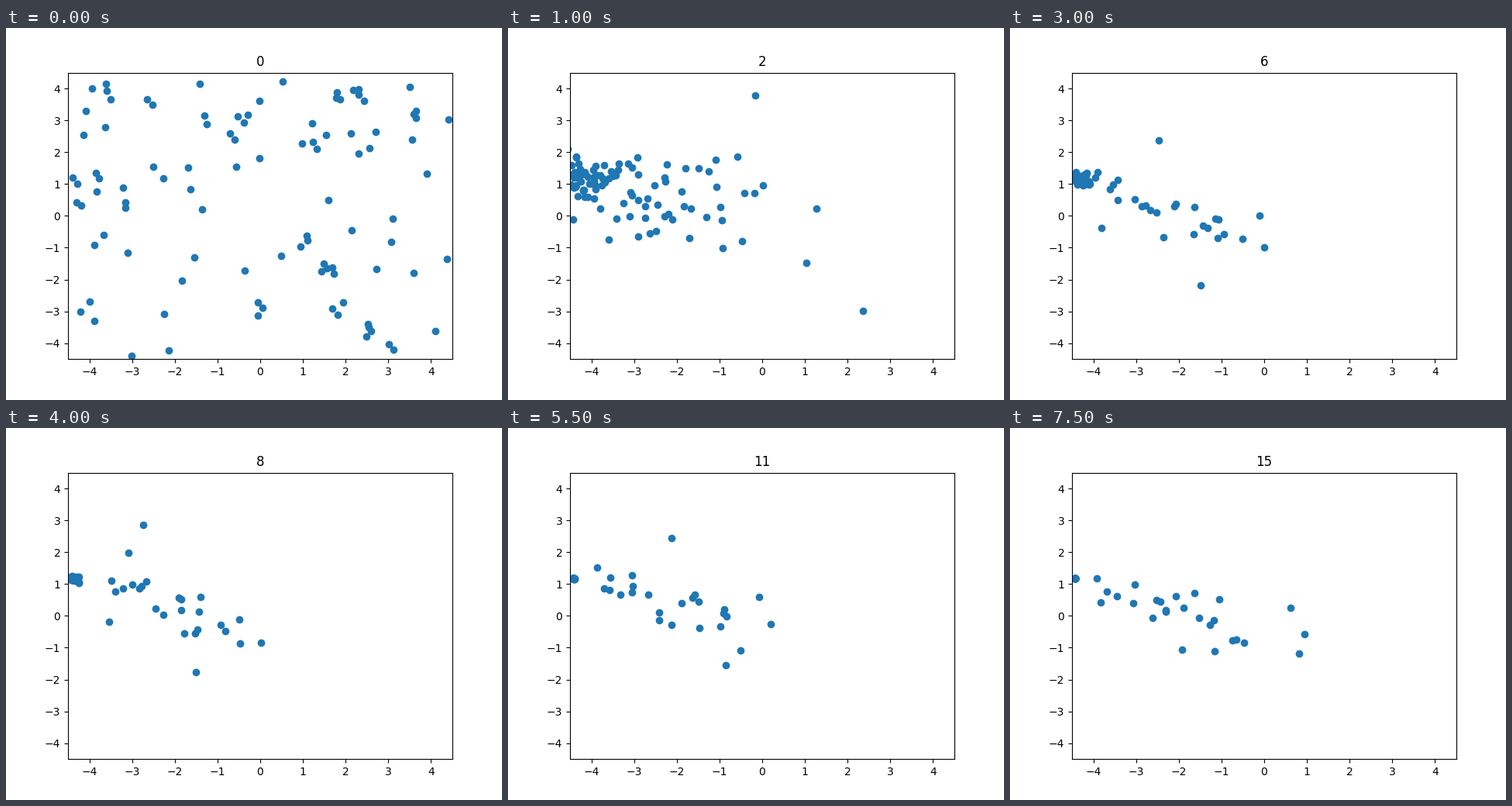
Write a matplotlib script that moves like this. It is 640x480 px and loops after 8 s.

```python
import matplotlib.pyplot as plt
import numpy as np
from matplotlib.animation import FuncAnimation

STEPS = 16
INTERVAL = 500
GOAL = np.array([84, 194])
SCATTERED, DRIFTERS = 60, 22

# Starting places, in stage pixels, of the dots that begin in pairs.
PAIRED = np.array([
    [130, 81], [182, 92], [116, 187], [86, 193], [91, 225], [299, 114],
    [289, 136], [427, 83], [455, 86], [396, 147], [526, 111], [325, 354],
    [388, 268], [410, 304], [421, 309], [421, 362], [467, 382], [494, 408],
])

# Waypoints of the dots that roam furthest, one row each.
KEY_STEPS = [0, 2, 4, 6, 10, 13, 15]
ROAM = np.array([
    [357, 69, 319, 87, 210, 137, 192, 145, 188, 146, 263, 112, 238, 213],
    [569, 298, 458, 365, 294, 304, 246, 332, 247, 298, 310, 276, 373, 291],
    [499, 246, 385, 303, 346, 257, 328, 283, 316, 250, 347, 263, 380, 266],
    [416, 222, 398, 233, 324, 214, 322, 242, 293, 211, 334, 225, 362, 232],
])

rng = np.random.default_rng(11)


def to_data(px):
    return (px - [328, 242.4]) / [496 / 9, -369.6 / 9]


def swarm_path(start):
    """Dots that collapse geometrically onto the goal."""
    path = [start]
    for k in range(1, STEPS):
        size = 0.3 * 0.6 ** (k - 1)
        pull = size * np.minimum(rng.exponential(size=(len(start), 1)), 2.8)
        noise = rng.normal(size=start.shape) * size * [40, 80]
        path.append(GOAL + (start - GOAL) * pull + noise)
    return np.array(path)


def drift_path(start):
    """Dots that settle into a loose band sloping away from the goal."""
    n = len(start)
    base = (np.arange(n) + 0.5) / n
    path = []
    for k in range(STEPS):
        x = 112 + 190 * np.clip(base + rng.normal(0, 0.07, n), 0, 1)
        y = GOAL[1] + 0.3 * (x - GOAL[0]) + rng.normal(0, 20, n)
        band = np.column_stack([x, y])
        path.append(band + (start - band) * 0.5 ** k)
    return np.array(path)


def roam_path():
    """Dots that visit their waypoints, shaken on the way between them."""
    k = np.arange(STEPS)
    path = np.array([[np.interp(k, KEY_STEPS, row[axis::2]) for axis in (0, 1)]
                     for row in ROAM]).transpose(2, 0, 1)
    between = ~np.isin(k, KEY_STEPS)
    path[between] += rng.normal(0, 10, path[between].shape)
    return path


mates = PAIRED + [5, 8] + rng.normal(0, 2, PAIRED.shape)
scattered = rng.uniform([84, 66], [572, 424], (SCATTERED, 2))
paths = to_data(np.concatenate([
    swarm_path(np.concatenate([PAIRED, mates, scattered[DRIFTERS:]])),
    drift_path(scattered[:DRIFTERS]),
    roam_path(),
], axis=1))

fig, ax = plt.subplots(figsize=(6.4, 4.8), dpi=100)
ax.set(xlim=(-4.5, 4.5), ylim=(-4.5, 4.5))
dots = ax.scatter(*paths[0].T, color="#1f77b4")
title = ax.set_title("0")


def draw(step):
    dots.set_offsets(paths[step])
    title.set_text(str(step))
    return dots, title


anim = FuncAnimation(fig, draw, frames=STEPS, interval=INTERVAL,
                     repeat=True, repeat_delay=0, blit=False)
plt.show()
```
